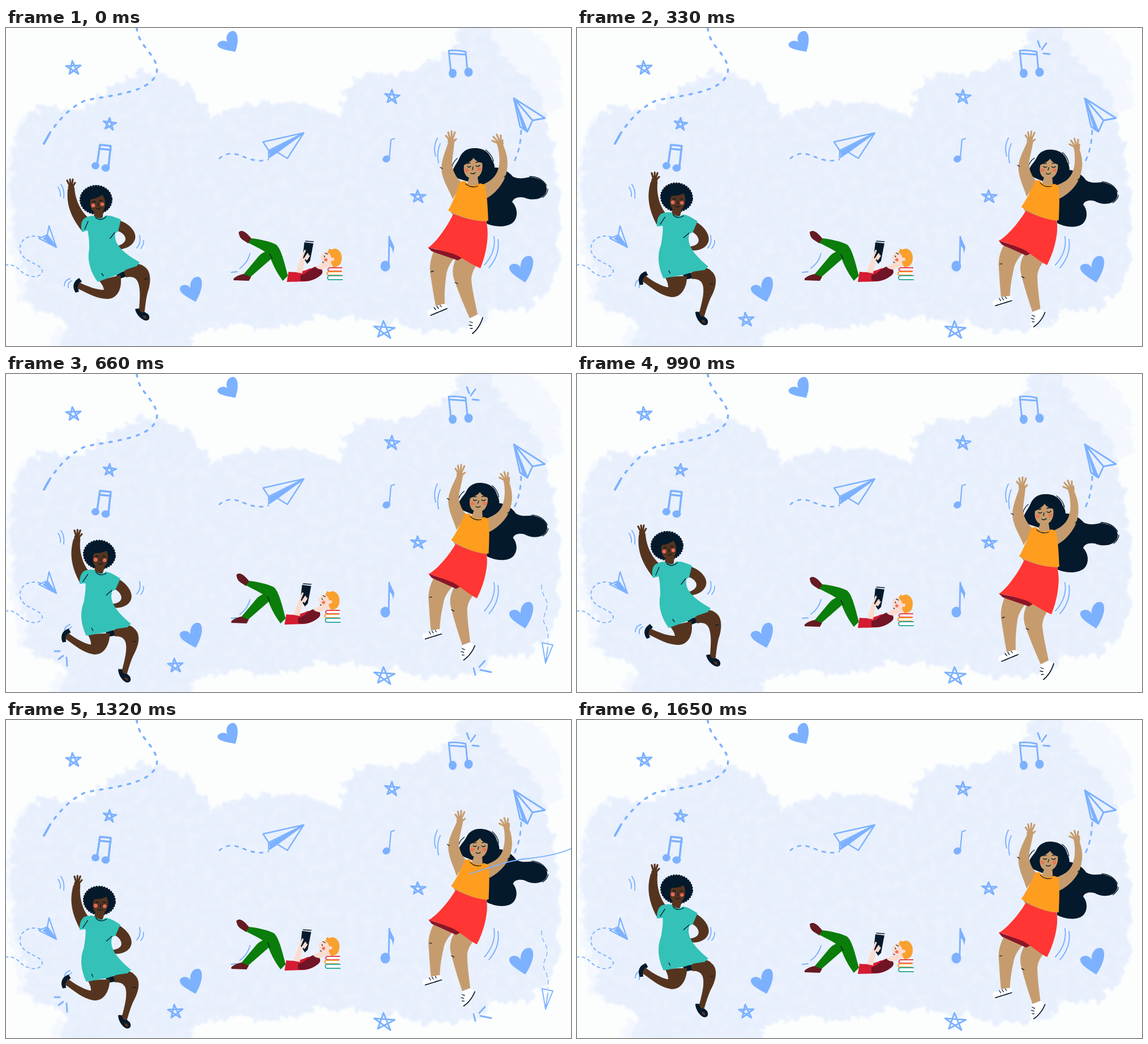
An HTML page for the animation above (1980 ms loop, 998 by 561 pixels).

```html
<!DOCTYPE html>
<html lang="en">
<head>
<meta charset="utf-8">
<title>Dancing and reading</title>
<style>
html, body { margin: 0; width: 100%; height: 100%; overflow: hidden; background: #fcfefe; }
svg { display: block; width: 100vw; height: 100vh; }
.line { fill: none; stroke: #7cb1ff; stroke-width: 2.9; stroke-linecap: round; stroke-linejoin: round; }
.thin { stroke-width: 1.9; }
.blue { fill: #7cb1ff; }
.ink { fill: #04192b; }
.pen { fill: none; stroke: #04192b; stroke-width: 1.3; stroke-linecap: round; }
.brown { fill: #55341f; }
.tan { fill: #c69c6e; }
.pale { fill: #fbdccf; }
.fingers { fill: none; stroke-width: 3.2; stroke-linecap: round; }
.white { fill: #fff; }
</style>
</head>
<body>
<svg viewBox="0 0 998 561" preserveAspectRatio="none">
  <defs>
    <path id="star" d="M-2-12L-7 11L13-4L-13-3L9 11Z" vector-effect="non-scaling-stroke"/>
    <path id="heart" d="M0 0C-14-8-29-15-27-24C-24-31-12-30-9-23C-11-37-1-46 7-42C14-36 11-18 0 0Z"/>
    <filter id="rough" x="-5%" y="-5%" width="110%" height="110%" color-interpolation-filters="sRGB">
      <feTurbulence type="fractalNoise" baseFrequency=".06" numOctaves="4" seed="8" result="noise"/>
      <feDisplacementMap in="SourceGraphic" in2="noise" scale="32" xChannelSelector="R" yChannelSelector="G"/>
      <feGaussianBlur stdDeviation="1.6" result="wash"/>
      <feColorMatrix in="noise" values="0 0 0 0 1  0 0 0 0 1  0 0 0 0 1  0 0 .5 0 -.16" result="specks"/>
      <feComposite in="specks" in2="wash" operator="in" result="mottle"/>
      <feMerge><feMergeNode in="wash"/><feMergeNode in="mottle"/></feMerge>
    </filter>
  </defs>

  <rect width="998" height="561" fill="#fcfefe"/>
  <g filter="url(#rough)">
    <path fill="#f3f7fe" d="M840-10L940 5L975 60L985 140L940 150L870 60ZM0 230L25 160L60 140L90 420L60 510L25 480L5 370ZM70 571L85 535L130 515L330 540L325 571Z"/>
    <path fill="#e7effd" d="M10 235C15 190 30 145 75 140C110 140 140 160 160 122C185 105 215 85 245 76C290 80 345 100 358 160
      C385 140 440 130 490 131C540 130 575 148 592 167C590 120 605 82 655 80C710 85 750 62 785 38L805-10L850-10
      C860 30 890 65 930 95C955 130 955 170 968 215C978 290 975 340 976 395C972 450 945 500 880 502
      C862 495 855 470 850 512C820 535 745 545 700 523C640 506 590 520 562 508C555 490 550 513 520 522
      C470 545 430 513 390 526L330 543L318 571L90 571C95 545 105 530 112 519C80 505 40 500 36 470C45 430 22 400 14 370Z"/>
  </g>

  <!-- fixed doodles -->
  <g class="line">
    <path stroke-width="3.6" stroke-dasharray="4.5 12" d="M231 0C233 25 252 38 261 55C275 78 262 96 235 107C205 119 165 122 140 128C112 140 92 164 77 186"/>
    <path stroke-width="4" d="M76 188L67 204"/>
    <use href="#star" x="119" y="70"/>
    <use href="#star" transform="translate(183 169) rotate(10) scale(.87)"/>
    <use href="#star" transform="translate(682 121) rotate(8)"/>
    <use href="#star" transform="translate(728 297) rotate(5) scale(1 .9)"/>
    <use href="#star" transform="translate(668 532) rotate(6) scale(1.4 1.25)"/>
    <path d="M786 78L782 40Q797 38 812 42L815 74M783 45L812 47"/>
    <path stroke-width="3.6" d="M161 240L166 206L185 208L181 244M165 213L185 215"/>
    <path stroke-width="2.2" d="M677 230L680 197L686 195"/>
    <path d="M676 417L677 368"/>
    <path stroke-width="2.4" d="M454 201L526 185L497 230L479 219L464 229L464 216ZM479 219L526 185L464 216"/>
    <path stroke-dasharray="5 10" d="M377 230C388 220 402 220 414 225C427 230 445 238 463 232"/>
    <path d="M897 124L952 159L930 163L921 183L908 174ZM930 163L897 124L921 183"/>
    <path stroke-dasharray="6 10" d="M910 181C909 203 906 219 897 237"/>
    <path stroke-width="2.3" d="M89 387L76 349L73 365L58 371ZM73 365L89 387L66 371"/>
    <g class="thin">
      <path stroke-dasharray="4.5 6" d="M61 369C40 362 22 375 25 393C30 415 65 415 64 430C58 445 35 438 25 428C18 420 10 417 1 418"/>
      <path d="M92 281Q97 288 96 297M97 276Q104 286 102 300M103 455Q103 445 113 442M110 458Q108 450 116 446"/>
      <path d="M231 388Q239 380 236 366M238 389Q244 382 243 375"/>
      <path d="M762 194Q754 210 759 226M767 204Q760 220 764 238M862 368Q866 395 845 418M869 373Q873 400 853 423"/>
      <path d="M431 398Q427 414 413 424M398 431L408 430"/>
    </g>
  </g>
  <g class="blue">
    <use href="#heart" transform="translate(405 42) rotate(-15) scale(1 .86)"/>
    <use href="#heart" transform="translate(335 483) scale(1.03)"/>
    <use href="#heart" transform="translate(917 449) rotate(4) scale(1.1)"/>
    <ellipse cx="789" cy="80" rx="7" ry="8"/><ellipse cx="817" cy="78" rx="7.5" ry="8"/>
    <ellipse cx="158" cy="243" rx="7" ry="6.5"/><ellipse cx="176" cy="247" rx="7.5" ry="6.5"/>
    <ellipse cx="672" cy="231" rx="7" ry="6" transform="rotate(-25 672 231)"/>
    <ellipse cx="670" cy="420" rx="8.5" ry="9.5"/>
    <path d="M677 367L686 386L684 398Q682 386 677 384ZM465 217L526 185L479 219L466 228ZM897 124L912 176L921 183ZM73 365L89 387L66 371Z"/>
  </g>

  <!-- doodles that come and go -->
  <g class="line" data-poses="12">
    <path d="M814 23L818 34M829 27L821 38M835 46L824 45"/>
    <use href="#star" x="299" y="514"/>
  </g>
  <g class="line" data-poses="2">
    <path d="M86 489L95 489M93 503L101 497M107 500L108 515M826 519L829 531M836 517L846 506M838 522L857 526"/>
    <g class="thin">
      <path d="M947 474L966 478L953 510ZM957 482L953 510"/>
      <path stroke-width="1.4" stroke-dasharray="7 6" d="M946 372C945 390 957 397 956 408C955 420 948 426 950 438C956 448 959 460 957 473"/>
    </g>
  </g>

  <g id="jumper">
    <path class="brown" d="M109 284C107 305 110 328 134 358L147 336C130 322 122 300 121 282Z"/>
    <path class="fingers" stroke="#55341f" d="M114 281L108 269M115 280L113 267M116 280L118 267M117 281L122 273"/>
    <ellipse class="brown" cx="115" cy="281" rx="5.5" ry="6"/>
    <ellipse class="ink" cx="159" cy="303" rx="27.5" ry="24"/>
    <ellipse class="pen" cx="159" cy="303" rx="27" ry="24" style="stroke-width:4.5" stroke-dasharray="0 4.6"/>
    <path class="brown" d="M150 302C158 301 165 298 170 294C176 301 177 314 172 322L171 333C168 341 157 340 155 334L156 325C149 320 147 309 150 302Z"/>
    <g fill="#e46a5b"><circle cx="154" cy="313" r="3.5"/><circle cx="170" cy="311" r="3.3"/></g>
    <path class="pen" d="M153 307Q156 305 158 307M165 305Q168 303 170 305M162 309L163 314M160 319Q164 321 167 317"/>
    <path class="brown" d="M202 340C221 347 233 363 227 375C222 386 208 391 195 391L193 385C203 384 212 378 211 371C210 365 204 360 197 358Z"/>
    <path class="ink" d="M193 433L219 427L213 438L200 443Z"/>
    <path class="brown" d="M164 445L202 436C206 456 199 477 180 478C160 478 145 468 127 460L131 450C148 457 160 462 173 462C172 455 168 450 164 445Z"/>
    <path class="brown" d="M208 430C215 418 232 412 243 420C258 428 256 450 250 467C247 480 246 490 245 500L235 498C236 480 238 465 234 451C231 440 222 437 212 440Z"/>
    <path class="ink" d="M129 441L134 447C128 452 126 458 129 465L123 467C116 456 119 447 129 441Z"/>
    <path class="brown" d="M129 449L136 452L132 461L126 459Z"/>
    <path class="ink" d="M228 496C236 492 242 500 250 504C256 510 253 517 246 516C238 514 230 505 228 496Z"/>
    <path class="brown" d="M234 494L245 495L244 502L238 501ZM241 507L247 508L249 513L244 512Z"/>
    <path fill="#33c1b8" d="M138 336C147 331 154 330 158 333C165 337 171 336 175 331C184 330 193 334 203 338L198 359L193 362C190 380 205 396 236 413L231 420L213 426L197 435L162 448C149 430 143 410 147 390C147 375 146 365 144 357L134 360C132 350 132 342 138 336Z"/>
    <path class="pen" d="M139 355L145 341M184 371L192 361M158 334Q167 342 177 333M169 433L172 437M245 443L250 442"/>
  </g>

  <g id="reader">
    <path fill="#651b22" d="M411 360C418 354 426 362 434 372L428 380C420 374 412 373 411 360ZM402 442C408 437 418 433 424 434L433 439L429 446L402 445Z"/>
    <g fill="#0a7d0a">
      <path d="M420 434L446 403C452 396 462 392 470 391L471 405L432 439Z"/>
      <path d="M434 371C450 373 468 377 477 382C487 390 493 420 498 437L489 446C478 432 470 415 465 400C455 392 440 385 428 379Z"/>
    </g>
    <path class="pen" d="M466 399L470 407"/>
    <path fill="#d41b31" d="M499 430C512 432 525 430 537 424L558 426C558 436 545 446 530 447L496 448Z"/>
    <path fill="#701426" d="M520 436C532 435 537 422 548 421C558 422 562 430 557 435C547 444 535 448 520 446Z"/>
    <path class="pale" d="M512 431L521 405L528 404L527 412L523 433ZM547 422L559 414L569 420C561 428 553 427 547 422Z"/>
    <path class="ink" d="M527 378L543 380L537 411L532 416L524 404Z"/>
    <path class="pen" d="M529 376L543 377"/>
    <path class="fingers" stroke="#fbdccf" d="M523 405L528 393M527 408L533 399M531 408L535 402"/>
    <path class="pale" d="M570 393L560 397L555 405L558 408C557 413 561 419 567 421C576 423 584 418 584 407C582 398 577 393 570 393Z"/>
    <path fill="#f9a02f" d="M568 396L571 389L575 391C584 385 594 395 593 406C593 416 588 422 578 422L574 414C577 407 574 399 568 396Z"/>
    <circle cx="565" cy="409" r="2.8" fill="#f0705f"/>
    <circle class="pale" cx="577" cy="408" r="3"/>
    <path class="pen" d="M562 402L563 404M564 397L568 399M559 413L561 414"/>
    <g fill="#fff" stroke-width="2">
      <path stroke="#e8424e" d="M594 423H571Q566 426 571 429H593"/>
      <path stroke="#f59a32" d="M592 430H569Q565 433 569 436H592"/>
      <path stroke="#35aaa3" d="M595 437H570Q566 441 570 444H595"/>
    </g>
  </g>

  <g id="dancer">
    <path class="ink" d="M789 261C786 248 797 240 801 229C806 216 818 211 829 212C846 212 855 222 858 232C862 238 863 242 863 246C876 246 890 255 895 262C905 267 915 265 925 263C945 264 957 275 955 287C952 302 930 306 915 299C905 297 896 300 894 307C905 318 905 337 893 345C880 353 860 350 849 345L845 280L800 266Z"/>
    <path class="pen" d="M787 252Q787 238 797 230M847 215Q858 222 861 235M925 262Q945 262 955 278M948 299Q957 292 957 284"/>
    <path class="tan" d="M781 202C775 222 765 240 771 260C776 278 784 288 789 302L806 273C795 265 787 250 788 235C790 220 791 212 792 202Z"/>
    <path class="tan" d="M868 207C873 225 873 245 866 257C860 268 850 272 843 276L848 301C862 294 880 275 884 255C888 235 885 222 878 206Z"/>
    <g class="fingers" stroke="#c69c6e">
      <path d="M785 200L777 190M785 198L781 184M787 198L787 182M788 198L793 184M790 201L795 196"/>
      <path d="M871 204L859 199M870 202L861 192M872 201L867 188M874 202L874 189M876 206L877 198"/>
    </g>
    <g class="tan"><circle cx="786" cy="200" r="6"/><circle cx="873" cy="204" r="6"/></g>
    <path class="tan" d="M826 229C820 237 812 240 809 242C807 255 813 263 818 264L815 274C820 281 831 280 835 275L833 263C840 259 843 248 841 238C835 237 829 234 826 229Z"/>
    <g fill="#ec7258"><circle cx="814" cy="251" r="3.3"/><circle cx="836" cy="249" r="3.3"/></g>
    <path class="pen" d="M815 244Q818 247 821 244M830 243Q834 246 837 242M815 239L820 238M830 237L835 236M825 245L824 250M821 256Q825 259 829 255"/>
    <path class="tan" d="M757 391C750 405 747 422 750 437C753 455 755 470 759 490L775 487C774 465 776 450 778 433C781 420 788 410 795 402Z"/>
    <path class="tan" d="M797 402C788 420 787 432 793 448C801 470 809 490 819 512L833 505C828 480 824 465 822 445C822 435 825 428 831 418Z"/>
    <path fill="#8a1528" d="M745 387L752 394L798 410L812 402Z"/>
    <path class="tan" d="M783 321L850 337L846 345L790 331Z"/>
    <path fill="#ff3633" d="M790 328C810 336 830 341 848 341C854 360 850 395 838 424C815 414 800 400 785 397C770 393 757 388 745 388C760 378 780 350 790 328Z"/>
    <path fill="#ff9d1f" d="M802 271L811 270C817 279 830 280 837 274L845 276C850 290 851 320 852 340C830 343 802 332 781 322C790 306 796 290 802 271Z"/>
    <path class="white" d="M746 498L768 488C775 485 781 489 779 496L751 509C744 507 743 502 746 498ZM819 513L833 506C841 508 843 512 841 518L826 539C820 541 816 536 817 530Z"/>
    <path class="pen" stroke-dasharray="4 1" style="stroke-width:1.8" d="M750 507L779 495M824 539Q837 528 842 511"/>
    <path class="pen" d="M756 493L759 497M761 491L764 495M767 489L769 492M819 518L824 520M818 524L823 525M820 530L824 530M767 246L771 248M880 263L883 260M812 275Q822 283 833 279M751 430L755 429M793 449L798 451"/>
  </g>

  <path class="line thin" data-steps="4" d="M820 271C850 262 880 250 915 245C950 242 980 235 998 227"/>
</svg>
<script>
const STEP = 330, order = [0, 1, 2, 0, 2, 1];
const lean = {
  jumper: 'translate(175 298.5) rotate(10.4) translate(-158 -303)',
  dancer: 'translate(800 190) rotate(5.2) scale(.96) translate(-785 -190)'
};
const moves = {
  jumper: ['', lean.jumper, 'translate(-11 20) ' + lean.jumper],
  reader: ['', '', 'translate(-4 -6)'],
  dancer: ['', lean.dancer, 'translate(1.5 -22.5) ' + lean.dancer]
};
const show = (el, on) => { el.style.visibility = on ? 'visible' : 'hidden'; };

let last = -1;
function draw(now) {
  const step = Math.floor(now / STEP) % order.length;
  if (step !== last) {
    const pose = order[step];
    for (const id in moves) document.getElementById(id).setAttribute('transform', moves[id][pose]);
    document.querySelectorAll('[data-poses]').forEach(el => show(el, el.dataset.poses.includes(pose)));
    document.querySelectorAll('[data-steps]').forEach(el => show(el, el.dataset.steps.includes(step)));
    last = step;
  }
  requestAnimationFrame(() => draw(performance.now()));
}
draw(performance.now());
</script>
</body>
</html>
```
